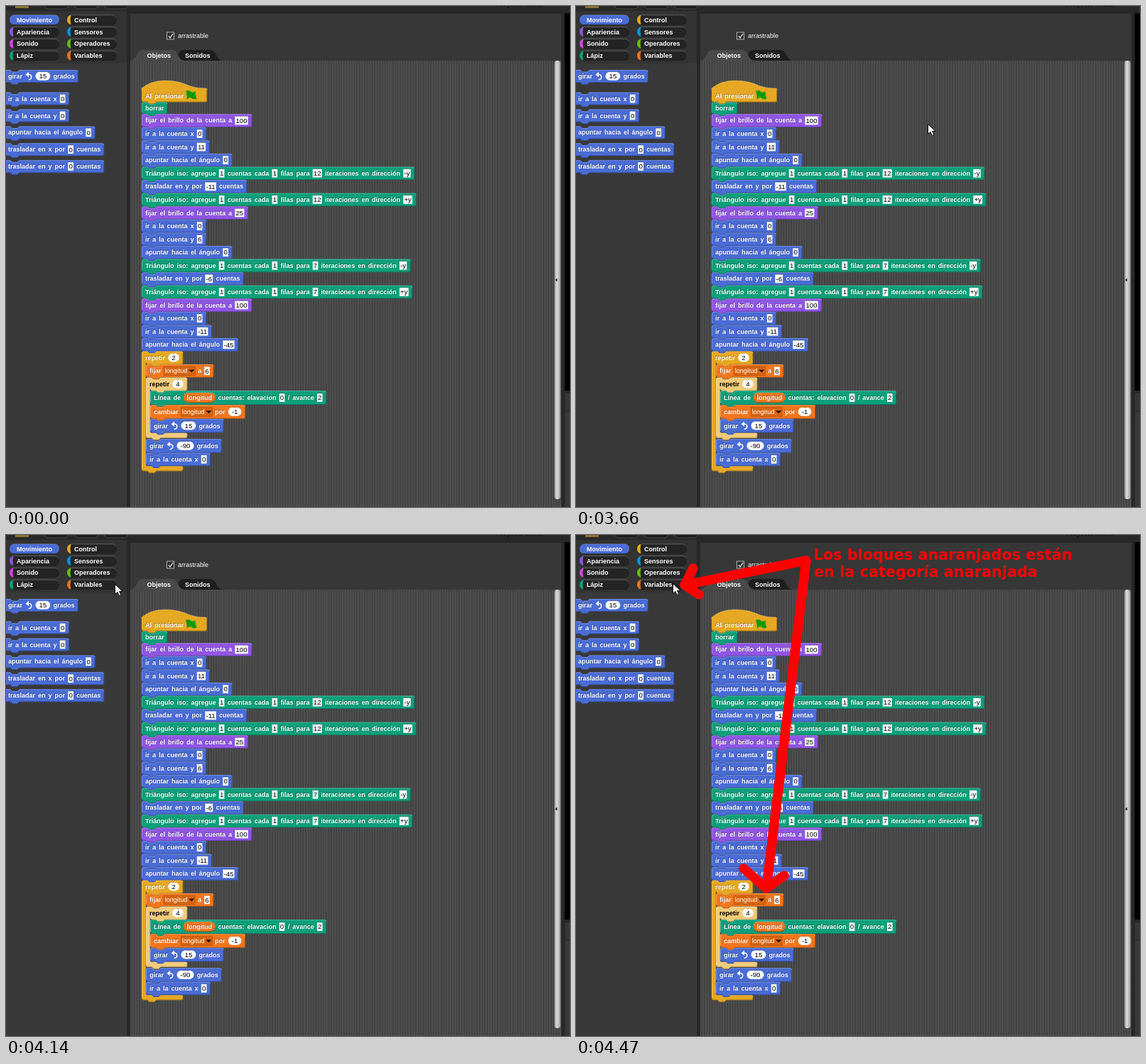
An HTML page for the animation above (8 s loop, 794 px wide and 706 px high).

```html
<!DOCTYPE html>
<html lang="es">
<head>
<meta charset="utf-8">
<title>Organizar los bloques</title>
<style>
html, body { margin: 0; width: 100%; height: 100%; overflow: hidden; background: #282828; }
svg { display: block; }
text { font: 9px "Liberation Sans", Arial, sans-serif; white-space: pre; }
.bold { font-weight: bold; }
.words { word-spacing: 1.5px; }
.value { font-size: 9.7px; }
.note text { font: bold 20.8px "DejaVu Sans", sans-serif; fill: #f00; }
.note path { fill: none; stroke: #f00; stroke-width: 13.5; stroke-linecap: round; stroke-linejoin: round; }
</style>
</head>
<body>
<svg id="stage" width="794" height="706" viewBox="0 0 794 706">
  <defs>
    <pattern id="stripes" width="3.6" height="8" patternUnits="userSpaceOnUse">
      <rect width="3.6" height="8" fill="#4f4f4f"/>
      <rect width="1.6" height="8" fill="#404040"/>
    </pattern>
    <linearGradient id="bevel" x2="0" y2="1">
      <stop offset="0" stop-color="#fff" stop-opacity=".3"/>
      <stop offset=".4" stop-color="#fff" stop-opacity="0"/>
      <stop offset=".6" stop-color="#000" stop-opacity="0"/>
      <stop offset="1" stop-color="#000" stop-opacity=".4"/>
    </linearGradient>
    <linearGradient id="bar">
      <stop offset="0" stop-color="#8c8c8c"/>
      <stop offset=".4" stop-color="#dedede"/>
      <stop offset="1" stop-color="#a0a0a0"/>
    </linearGradient>
  </defs>
  <g id="panels">
    <rect x="13" y="-16" width="19" height="19" fill="#8a7434"/>
    <g fill="#1c1c1c" stroke="#4a4a4a">
      <rect x="54" y="-16" width="34" height="20" rx="6"/>
      <rect x="96" y="-16" width="34" height="20" rx="6"/>
      <rect x="138" y="-16" width="34" height="20" rx="6"/>
    </g>
    <text x="690" y="1" class="bold" fill="#0c0c0c">Proyecto inicial</text>
    <rect y="7" width="170" height="74" fill="#333"/>
    <rect y="81" width="170" height="625" fill="#393939"/>
    <rect x="175" y="11" width="607" height="66" fill="#373737"/>
    <rect x="175" y="77" width="607" height="629" fill="url(#stripes)"/>
    <path d="M233 77q6-1 9-8q3-7 8-7h38q5 0 8 7q3 7 9 8z" fill="#1e1e1e"/>
    <path d="M175 77q6-1 9-8q3-7 8-7h42q5 0 8 7q3 7 9 8z" fill="#4a4a4a"/>
    <text x="198.500" y="73" class="bold" fill="#fff">Objetos</text>
    <text x="252" y="73" class="bold" fill="#fff">Sonidos</text>
    <rect x="226.500" y="37" width="10" height="10" fill="#2a2a2a" stroke="#b4b4b4"/>
    <path d="M229 42l2 3l4-6" fill="none" stroke="#fff" stroke-width="1.200"/>
    <text x="242" y="45" fill="#fff">arrastrable</text>
    <rect x="772" y="77" width="8.500" height="618" rx="4" fill="url(#bar)"/>
    <path d="M776 383.500v5l-3-2.500z" fill="#222"/>
    <rect x="786.500" y="10" width="7.500" height="532" fill="#000"/>
    <rect x="787" y="546" width="7" height="24" fill="#373737"/>
    <rect x="787" y="571" width="7" height="135" fill="#393939"/>
  </g>
  <g id="blocks"></g>
  <g id="cursor">
    <path d="M.5 .5V14.500L4 11.300L6.300 16.500L8.800 15.400L6.500 10.400H11z" fill="#fff" stroke="#000" stroke-width=".9"/>
  </g>
  <g class="note" id="many">
    <path d="M166 10L174 11.500V234L163.500 234.500M174 40L397 36.500"/>
    <text x="413" y="37">Tenemos demasiados bloques.</text>
    <text x="411.500" y="61.500">Necesitamos organizarlos.</text>
  </g>
  <g class="note" id="orange">
    <path d="M165 47L153 70.500L173 84M153 70.500L324 36L268 498M236 470L268 498L293 480"/>
    <text x="334.500" y="34.500">Los bloques anaranjados están</text>
    <text x="335" y="59">en la categoría anaranjada</text>
  </g>
</svg>
<script>
const BLUE = '#4a6cd4', PURPLE = '#8f56e3', TEAL = '#0e9f7a', GOLD = '#e6a822',
      PALE = '#f0cb7a', ORANGE = '#f3761d';
const GAP = 3.7;
const $ = id => document.getElementById(id);
const layer = $('blocks');

function add(tag, attrs, text) {
  const el = document.createElementNS('http://www.w3.org/2000/svg', tag);
  for (const key in attrs) el.setAttribute(key, attrs[key]);
  if (text) el.textContent = text;
  layer.append(el);
}

const pen = document.createElement('canvas').getContext('2d');
function measure(text, style) {
  pen.font = `${style} "Liberation Sans", Arial, sans-serif`;
  return pen.measureText(text).width;
}

function label(text, x, mid, fill = '#fff') {
  if (fill === '#fff') {
    add('text', { x: x - .8, y: mid + 2.4, class: 'bold words', fill: '#000', opacity: .3 }, text);
  }
  add('text', { x, y: mid + 3.2, class: 'bold words', fill }, text);
  return measure(text, 'bold 9px') + 1.5 * (text.split(' ').length - 1);
}

// Each drawing helper returns the width it used.
function slot(text, x, mid, pad, rx) {
  const w = measure(text, '9.7px') + pad;
  add('rect', { x: x + .6, y: mid - 6, width: w - 1.2, height: 12, rx, fill: '#fff' });
  add('path', { d: `M${x + .6 + rx} ${mid - 6}h${w - 1.2 - 2 * rx}`, stroke: '#000', 'stroke-opacity': .35, 'stroke-width': .8 });
  add('text', { x: x + pad / 2, y: mid + 3.4, class: 'value', fill: '#000' }, text);
  return w;
}

const parts = {
  '[': (text, x, mid) => slot(text, x, mid, 3.4, 0),
  '(': (text, x, mid) => slot(text, x, mid, 11.2, 6),
  '<': (text, x, mid) => {
    add('rect', { x, y: mid - 6, width: 44, height: 12.5, fill: '#d9640f', stroke: '#a84e0c', 'stroke-width': .7 });
    add('text', { x: x + 1.5, y: mid + 3.3, fill: '#fff' }, text);
    add('path', { d: `M${x + 35} ${mid - 1.5}h8l-4 4z`, fill: '#111' });
    return 44;
  },
  '{': (text, x, mid) => {
    add('rect', { x, y: mid - 7, width: 45, height: 14, rx: 7, fill: ORANGE, stroke: 'url(#bevel)' });
    label(text, x + 4.7, mid);
    return 45;
  },
  '@': (text, x, mid) => {
    add('path', { d: `M${x + 5} ${mid + 5}q4.500-.5 4-4.500q-.6-3-5-3`, fill: 'none', stroke: '#fff', 'stroke-width': 1.6 });
    add('path', { d: `M${x + .8} ${mid - 2}l4.500-4v7.500z`, fill: '#fff' });
    return 10.5;
  }
};

// [0] box, (0) pill, <name> menu, {name} variable, @ turn arrow
function layOut(spec, x, mid, fill) {
  for (const raw of spec.split(/(\[.*?\]|\(.*?\)|<.*?>|\{.*?\}|@)/)) {
    const piece = raw.trim();
    if (!piece) continue;
    const draw = parts[piece[0]];
    x += GAP + (draw ? draw(piece.slice(1, -1), x, mid) : label(piece, x, mid, fill));
  }
  return x - GAP;
}

const SOCKET = 'l2.700 2.700h7.200l2.700-2.700';
const PLUG = 'l-2.700 2.700h-7.200l-2.700-2.700';

function topEdge(x, y, right) {
  return `M${x} ${y + 2.5}q0-2.500 2.500-2.500H${x + 8}${SOCKET}H${right - 2.5}q2.500 0 2.500 2.500`;
}
function bottomEdge(x, y) {
  return `V${y - 2.5}q0 2.500-2.500 2.500H${x + 20.6}${PLUG}H${x + 2.5}q-2.500 0-2.500-2.500`;
}
function rim(d, stroke, opacity) {
  add('path', { d, fill: 'none', stroke, 'stroke-width': .9, 'stroke-opacity': opacity });
}
const lit = d => rim(d, '#fff', .25);
const shade = d => rim(d, '#000', .3);

// The text's width sets the shape, so the text is laid out first and moved on top.
function wrap(x, mid, spec, fill, drawShape) {
  const mark = layer.childNodes.length;
  const right = layOut(spec, x + 5, mid, fill) + 5;
  const made = [...layer.childNodes].slice(mark);
  drawShape(right);
  layer.append(...made);
}

function block(x, y, h, color, spec) {
  wrap(x, y + h / 2 - .2, spec, '#fff', right => {
    add('path', { d: topEdge(x, y, right) + bottomEdge(x, y + h) + 'z', fill: color });
    lit(`${topEdge(x + .45, y + .45, right - .45)}M${x + .45} ${y + 2.5}V${y + h - 2.5}`);
    shade(`M${right - .45} ${y + 2.5}${bottomEdge(x + .45, y + h - .45)}`);
  });
}

function loop(x, y, inner, foot, bottom, color, spec, fill) {
  const arm = x + 6;
  wrap(x, y + 9, spec, fill, right => {
    const mouth = `${bottomEdge(arm, inner)}V${foot - 2.5}q0 2.500 2.500 2.500`;
    const lip = `H${right - 2.5}q2.500 0 2.500 2.500`;
    add('path', { d: topEdge(x, y, right) + mouth + lip + bottomEdge(x, bottom) + 'z', fill: color });
    lit(`${topEdge(x + .45, y + .45, right - .45)}M${x + .45} ${y + 2.5}V${bottom - 2.5}M${arm + 2.5} ${foot + .45}${lip}`);
    shade(`M${right - .45} ${y + 2.5}${mouth}M${right - .45} ${foot + 2.5}${bottomEdge(x + .45, bottom - .45)}`);
  });
}

function category(name, color, col, row) {
  const x = 5 + col * 81, y = 12.8 + row * 16.8, on = name === 'Movimiento';
  add('rect', { x: x + .5, y, width: 69.5, height: 13.4, rx: 6.5, fill: on ? color : '#242424', stroke: 'url(#bevel)', 'stroke-width': .8 });
  add('path', { d: `M${x + 5} ${y + .5}q-4.500 1-4.500 6.200t4.500 6.200q-2-6.200 0-12.400z`, fill: color, stroke: color, 'stroke-width': .9 });
  add('text', { x: x + 10, y: y + 10, class: 'bold', fill: '#fff' }, name);
}

[['Movimiento', BLUE], ['Control', GOLD], ['Apariencia', PURPLE], ['Sensores', '#0494dc'],
 ['Sonido', '#cf4ad9'], ['Operadores', '#62c213'], ['Lápiz', '#00a178'], ['Variables', ORANGE]]
  .forEach(([name, color], i) => category(name, color, i % 2, i >> 1));

block(-2, 90, 18, BLUE, 'girar @ (15) grados');
['ir a la cuenta x [0]', 'ir a la cuenta y [0]', 'apuntar hacia el ángulo [0]',
 'trasladar en x por [0] cuentas', 'trasladar en y por [0] cuentas']
  .forEach((spec, i) => block(-2, 121.6 + i * 23.9, 18, BLUE, spec));

const LEFT = 191;
const hat = `M${LEFT} 118.500V115.800A51.300 51.300 0 0 1 ${LEFT + 31.5} 105C${LEFT + 63} 105 ${LEFT + 63} 115.800 280.500 115.800q2.500 0 2.500 2.500`;
add('path', { d: hat + bottomEdge(LEFT, 135.5) + 'z', fill: GOLD });
lit(hat);
shade(`M282.550 118${bottomEdge(LEFT + .45, 135)}`);
label('Al presionar', 196, 126.3);
add('path', { d: 'M253 120q4-2 7 .5t7-.5q-1 6 1.500 10.500q-4 2-7-.5t-7 2q1-6-1.500-12z', fill: '#0b9a0b' });

block(LEFT, 135.5, 17, TEAL, 'borrar');

const triangle = (n, dir) =>
  [TEAL, `Triángulo iso: agregue [1] cuentas cada [1] filas para [${n}] iteraciones en dirección [${dir}]`];
const glow = n => [PURPLE, `fijar el brillo de la cuenta a [${n}]`];
const goTo = (axis, n) => [BLUE, `ir a la cuenta ${axis} [${n}]`];
const point = n => [BLUE, `apuntar hacia el ángulo [${n}]`];
const shift = n => [BLUE, `trasladar en y por [${n}] cuentas`];

const PITCH = 18.58;
[glow(100), goTo('x', 0), goTo('y', 11), point(0), triangle(12, '-y'), shift(-11), triangle(12, '+y'),
 glow(25), goTo('x', 0), goTo('y', 6), point(0), triangle(7, '-y'), shift(-6), triangle(7, '+y'),
 glow(100), goTo('x', 0), goTo('y', -11), point(-45)]
  .forEach(([color, spec], i) => block(LEFT, 152.2 + i * PITCH, PITCH, color, spec));

loop(LEFT, 486.6, 505, 648.3, 655.5, GOLD, 'repetir (2)', '#fff');
block(LEFT + 6, 505, 18.6, ORANGE, 'fijar <longitud> a [6]');
loop(LEFT + 6, 523.6, 542.1, 601.5, 609, PALE, 'repetir (4)', '#000');
block(LEFT + 12, 542.1, 20, TEAL, 'Línea de {longitud} cuentas: elavacion [0] / avance [2]');
block(LEFT + 12, 562.1, 19.6, ORANGE, 'cambiar <longitud> por (-1)');
block(LEFT + 12, 581.7, 19.6, BLUE, 'girar @ (15) grados');
block(LEFT + 6, 610.1, 19.6, BLUE, 'girar @ (-90) grados');
block(LEFT + 6, 629.7, 18.5, BLUE, goTo('x', 0)[1]);

// time, x, y of the pointer
const PATH = [[3500, 704, 232], [3860, 233, 84], [4000, 87, 62], [4140, 153, 69],
              [4340, 137, 68], [4470, 136, 68]];
const LOOP = 8000, STEP = 40;

function pointer(t) {
  const i = PATH.findIndex(p => p[0] > t);
  if (i < 0) return PATH[PATH.length - 1].slice(1);
  const a = PATH[i - 1], b = PATH[i], k = (t - a[0]) / (b[0] - a[0]);
  return [1, 2].map(n => Math.round(a[n] + (b[n] - a[n]) * k));
}

const show = (id, on) => $(id).setAttribute('visibility', on ? 'visible' : 'hidden');
const start = performance.now();

function render() {
  const t = (performance.now() - start) % LOOP;
  show('many', t >= 1000 && t < 3500);
  show('orange', t >= 4470);
  show('cursor', t >= 3500);
  if (t >= 3500) {
    const tick = t >= 4470 ? t : Math.min(4340, t - (t - 3500) % STEP);
    $('cursor').setAttribute('transform', `translate(${pointer(tick)})`);
  }
  requestAnimationFrame(render);
}
render();
</script>
</body>
</html>
```
